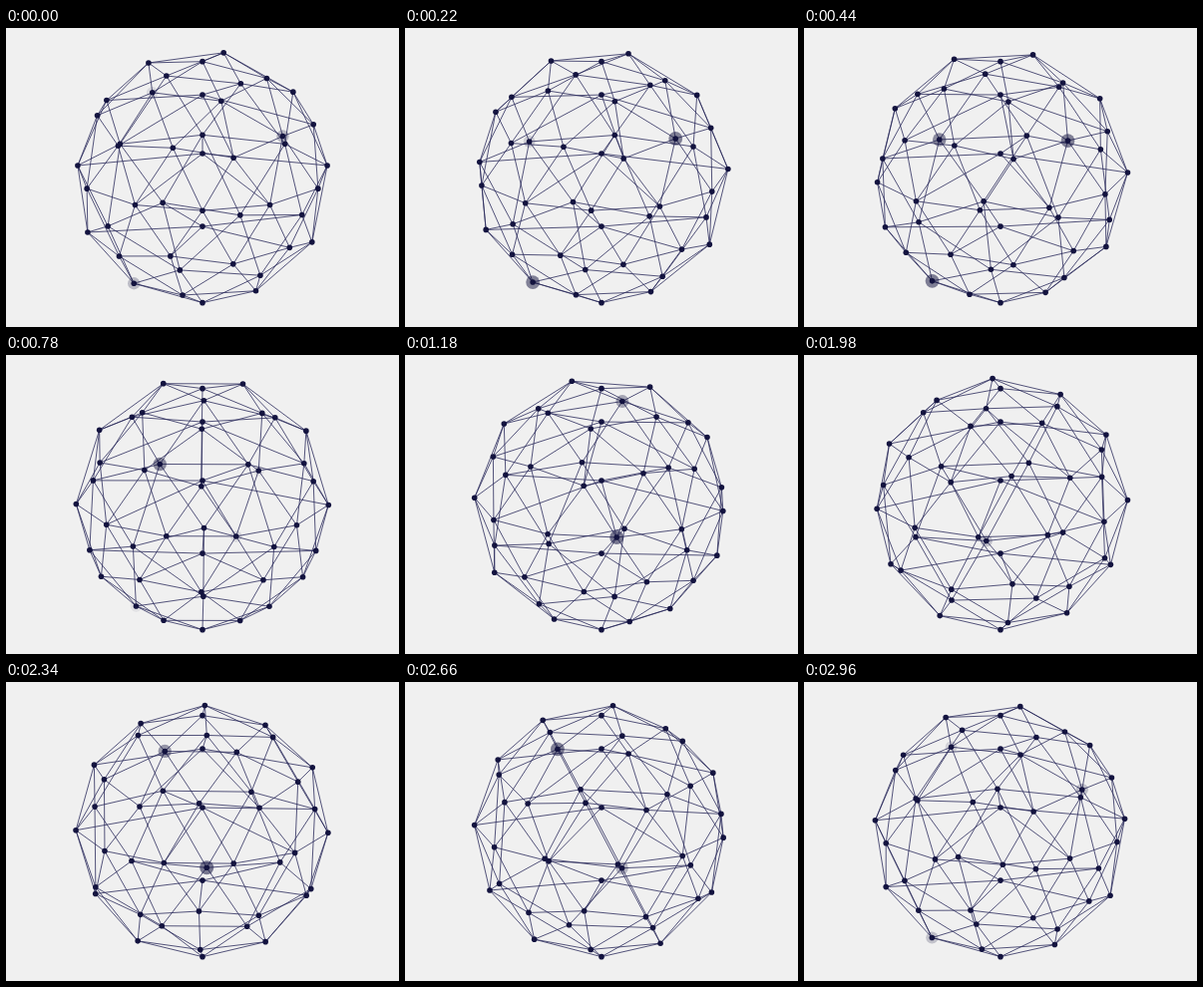
An HTML page with a canvas that plays this animation: 394x300 px, repeating every 2980 ms.

```html
<!DOCTYPE html>
<html lang="en">
<head>
<meta charset="utf-8">
<title>Rotating network sphere</title>
<style>
html, body { margin: 0; width: 100%; height: 100%; overflow: hidden; background: #f0f0f0; }
canvas { display: block; }
</style>
</head>
<body>
<canvas id="stage" width="394" height="300"></canvas>
<script>
const ctx = document.getElementById('stage').getContext('2d');
const RAD = Math.PI / 180;
const LOOP = 2980, STEP = 20, TURN = 0.4784;
const CX = 197, CY = 150, RADIUS = 126.5, CAMERA = 7.7;
const TILT_SIN = Math.sin(17.2 * RAD), TILT_COS = Math.cos(17.2 * RAD);
const INK = '#13133f', LINE = '#2b2b5c';

// Rings of five points: latitude and first azimuth, in degrees.
const RINGS = {
  cap:      [58.28, 18],
  upperMid: [31.72, 54],
  upper:    [26.57, 18],
  equatorA: [0, 0],
  equatorB: [0, 36],
  lower:    [-26.57, 54],
  lowerMid: [-31.72, 18],
  base:     [-58.28, 54]
};

// Axis nodes: height and the ring they are tied to.
const HUBS = [[0.705, 'upper'], [0.2, 'equatorA'], [-0.4, 'lower']];

// Halos: ring, index on the ring, time of the peak in ms.
const HALOS = [
  ['upperMid', 1, 330],
  ['base', -2, 340],
  ['equatorB', -1, 610],
  ['equatorA', 2, 1200],
  ['upperMid', -1, 1450],
  ['lowerMid', -1, 2340],
  ['cap', -3, 2560]
];
const HALO_HALF = 480, HALO_ALPHA = 0.55;

function ringPoint(name, k) {
  const [lat, start] = RINGS[name];
  const az = (start + 72 * k) * RAD, r = Math.cos(lat * RAD);
  return { x: r * Math.sin(az), y: Math.sin(lat * RAD), z: r * Math.cos(az), ring: name };
}

const points = [{ x: 0, y: 1, z: 0 }, { x: 0, y: -1, z: 0 }];
for (const name in RINGS)
  for (let k = 0; k < 5; k++) points.push(ringPoint(name, k));

// Neighbours on the sphere are joined, then each hub gets its spokes.
const edges = [];
points.forEach((a, i) => points.forEach((b, j) => {
  if (j > i && Math.hypot(a.x - b.x, a.y - b.y, a.z - b.z) < 0.7) edges.push([i, j]);
}));
for (const [y, ring] of HUBS) {
  const hub = points.push({ x: 0, y, z: 0 }) - 1;
  points.forEach((p, i) => { if (p.ring === ring) edges.push([hub, i]); });
}

function project(p, deg) {
  const c = Math.cos(deg * RAD), s = Math.sin(deg * RAD);
  const x = p.x * c + p.z * s, z = p.z * c - p.x * s;
  const up = p.y * TILT_COS + z * TILT_SIN;
  const depth = z * TILT_COS - p.y * TILT_SIN;
  const scale = RADIUS * CAMERA / (CAMERA - depth);
  return [CX + x * scale, CY - up * scale];
}

function disc([x, y], r) {
  ctx.beginPath();
  ctx.arc(x, y, r, 0, 2 * Math.PI);
  ctx.fill();
}

function drawHalos(t, angle) {
  for (const [ring, k, peak] of HALOS)
    for (const lap of [-1, 0, 1]) {
      const d = Math.abs(t + lap * LOOP - peak) / HALO_HALF;
      if (d >= 1) continue;
      const level = Math.cos(d * Math.PI / 2);
      ctx.globalAlpha = HALO_ALPHA * level;
      disc(project(ringPoint(ring, k + lap), angle), 5.5 + 1.5 * level);
    }
  ctx.globalAlpha = 1;
}

function draw(now) {
  const step = Math.floor((now % LOOP) / STEP);
  const angle = step * TURN;
  const pos = points.map(p => project(p, angle));

  ctx.fillStyle = '#f0f0f0';
  ctx.fillRect(0, 0, 394, 300);

  ctx.strokeStyle = LINE;
  ctx.lineWidth = 0.8;
  ctx.beginPath();
  for (const [a, b] of edges) {
    ctx.moveTo(...pos[a]);
    ctx.lineTo(...pos[b]);
  }
  ctx.stroke();

  ctx.fillStyle = INK;
  drawHalos(step * STEP, angle);
  pos.forEach(p => disc(p, 2.8));
}

function tick() {
  draw(performance.now());
  requestAnimationFrame(tick);
}
tick();
</script>
</body>
</html>
```
